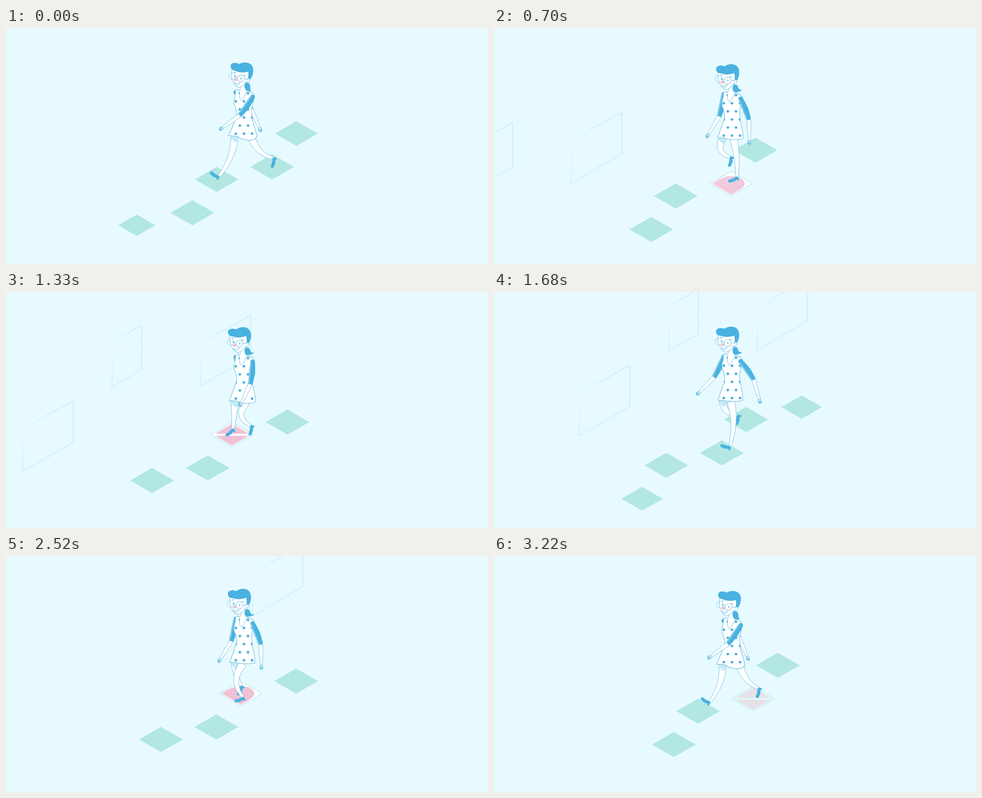
These frames come from a looping animation (1066 px wide and 525 px high, 3.29 s). An HTML page with a canvas:

```html
<!DOCTYPE html>
<html lang="en">
<head>
<meta charset="utf-8">
<title>Walking across tiles</title>
<style>
  html, body { margin: 0; width: 100%; height: 100%; overflow: hidden; background: #e7faff; }
  canvas { display: block; width: 100vw; height: 100vh; }
</style>
</head>
<body>
<canvas id="stage" width="1066" height="525"></canvas>
<script>
const ctx = document.getElementById('stage').getContext('2d');
const BG = '#e7faff', BLUE = '#49b2e0', LIGHT = '#8fd0ea', PALE = '#c5e9f5', LINE = '#74c0df',
      GREEN = '#b2e7e2', PINK = '#efc1d6', WALL = '#d1f1f5';

const TICK = 70, TICKS = 47, SPAN = 146, STEP = SPAN / 6, STRIDE = 48;
const skips = [10, 21, 28, 34];

const clamp = v => Math.max(0, Math.min(1, v));
const ramp = (v, from, length) => clamp((v - from) / length);
const smooth = t => t * t * (3 - 2 * t);
const easeOut = t => 1 - (1 - t) ** 2;
const mix = (a, b, t) => a + (b - a) * t;
const mixPoint = (a, b, t) => [mix(a[0], b[0], t), mix(a[1], b[1], t)];
const middle = (a, b) => mixPoint(a, b, .5);
const rad = deg => deg * Math.PI / 180;
const swing = (w, lead) => Math.cos(2 * Math.PI * (w + lead) / STRIDE);

// Eases between the turning points of one stride: [moment, value].
function sway(w, turns) {
  const i = turns.findLastIndex(([moment]) => moment <= w);
  const [t0, a] = turns.at(i), [t1, b] = turns[(i + 1) % turns.length];
  const wrap = t => (t + STRIDE) % STRIDE;
  return mix(a, b, (1 - Math.cos(Math.PI * wrap(w - t0) / wrap(t1 - t0))) / 2);
}

// Drawing helpers
function paint(path, fill, line, width = 1) {
  if (fill) { ctx.fillStyle = fill; ctx.fill(path); }
  if (line) { ctx.strokeStyle = line; ctx.lineWidth = width; ctx.stroke(path); }
}
const draw = (d, fill, line, width) => paint(new Path2D(d), fill, line, width);
function disc(x, y, r, fill, line) {
  const p = new Path2D();
  p.arc(x, y, r, 0, 7);
  paint(p, fill, line);
}
function stroke(a, b, color, width, cap = 'round') {
  ctx.lineCap = cap;
  ctx.lineWidth = width;
  ctx.strokeStyle = color;
  ctx.beginPath();
  ctx.moveTo(...a);
  ctx.lineTo(...b);
  ctx.stroke();
}

// Tapered tube that bends through a middle point.
function tube(a, k, b, w0, w1, w2) {
  const c = [0, 1].map(i => 2 * k[i] - (a[i] + b[i]) / 2);
  const left = [], right = [];
  for (let i = 0; i <= 16; i++) {
    const t = i / 16, p = mixPoint(mixPoint(a, c, t), mixPoint(c, b, t), t);
    const v = [0, 1].map(j => mix(c[j] - a[j], b[j] - c[j], t));
    const r = (t < .5 ? mix(w0, w1, t * 2) : mix(w1, w2, t * 2 - 1)) / 2 / (Math.hypot(...v) || 1);
    left.push([p[0] + v[1] * r, p[1] - v[0] * r]);
    right.unshift([p[0] - v[1] * r, p[1] + v[0] * r]);
  }
  return new Path2D('M' + left.concat(right).map(p => p.join(' ')).join('L') + 'Z');
}

// Walls
const noise = n => { const v = Math.sin(n * 91.7) * 4375.5; return v - Math.floor(v); };
function brush(a, b, from, to, seed) {
  const n = 22;
  for (let i = 0; i < n; i++) {
    const t = i / n, strength = mix(from, to, t);
    ctx.globalAlpha = clamp(strength * 1.3);
    stroke(mixPoint(a, b, t), mixPoint(a, b, t + 1 / n), WALL,
           (.8 + 2.2 * strength) * (.75 + .4 * noise(i + seed)), 'butt');
  }
  ctx.globalAlpha = 1;
}
function wall(x, y, w, h) {
  const tl = [x - w + 3, y + .54 * w], tr = [x, y], br = [x, y + h], bl = [x - w, y + h + .585 * w];
  brush(tl, tr, .35, 1, 1);
  brush(tr, br, .95, .85, 31);
  brush(br, bl, .75, .65, 67);
  brush(bl, tl, .8, 0, 93);
}
function walls(s) {
  const d = s - 58, x = 9.53 * d - .0022 * d * d, y = -.525 * x;
  wall(541.5 + x, 52 + y, 112, 92);
  wall(300 + x, 74 + y, 66, 99);
  wall(148.5 + x, 242.5 + y, 112, 92);
}

// Tiles
const motifs = [
  'M-22 -12.5L42.5 -.5L-.5 24.5Z',
  'M-42 0C-25 -11 -14 -17 2 -16.5C20 -16 30 -8 30 0C30 8 22 12 0 24.5Z',
  'M-37 -2L0 -24L37 -2ZM-37 2.5L0 24.5L37 2.5Z'
];
const diamond = (w, h) => `M${-w} 0L0 ${-h}L${w} 0L0 ${h}Z`;
function tiles(s) {
  for (let i = -6; i <= 6; i++) {
    const age = s + 4 - STEP * i, turn = (i + 8) % 6;
    if (age <= 0 || age > 107.5) continue;
    const size = easeOut(ramp(age, 0, 6.5)) - ramp(age, 100.5, 7) ** 2;
    const [x, y] = i % 2 ? [309.4, 470.4] : [274.8, 447.2];
    const lit = ramp(age, 55.5, 4.5) * (1 - ramp(age, turn === 1 ? 71.7 : 69, 7));
    ctx.save();
    ctx.translate(x + 3.627 * age, y - 2.096 * age);
    ctx.scale(size, size);
    draw(diamond(48.3, 27.9), lit < 1 ? GREEN : BG);
    if (lit > 0) {
      ctx.globalAlpha = lit;
      draw(diamond(48.5, 28), BG);
      draw(diamond(47.3, 27.2), '#fff', '#9fd9dc');
      draw(motifs[turn % 3], PINK);
    }
    ctx.restore();
  }
}

// Legs: u runs from landing (0) through lift-off (.5) to the next landing (1).
function leg(u, hip, land, lift, arc, shaded) {
  const away = u < .5 ? u * 2 : 2 - u * 2, rise = u < .5 ? 0 : Math.sin(2 * Math.PI * (u - .5));
  const ankle = mixPoint(land, lift, away).map((v, i) => v + arc[i] * rise);

  const bend = mix(-8, mix(-8, 18, clamp(u / .75)), 1 - smooth(ramp(u, .8, .17)));
  const span = [ankle[0] - hip[0], ankle[1] - hip[1]], reach = Math.hypot(...span);
  const mid = middle(hip, ankle);
  const knee = [mid[0] - span[1] / reach * bend, mid[1] + span[0] / reach * bend];

  const shape = tube(hip, knee, ankle, 17, 11, 5.5);
  paint(shape, '#fff', LINE);
  if (shaded) {
    ctx.save();
    ctx.clip(shape);
    const [x, y] = hip;
    draw(`M${x - 14} ${y - 6}H${x + 14}V${y + 3}L${x + 2} ${y + 15}L${x - 12} ${y + 2}Z`, PALE);
    ctx.restore();
  }

  const pitch = rad(-28 + 108 * easeOut(clamp(u * 2)) * (1 - smooth(ramp(u, .74, .18))));
  const dx = -Math.cos(pitch), dy = Math.sin(pitch);
  const from = (along, below) => [ankle[0] + dx * along + dy * below, ankle[1] + dy * along - dx * below];
  stroke(ankle, from(0, 5), BLUE, 4.5);
  paint(tube(ankle, from(9, 1.5), from(18, 0), 6, 7.5, 6.5), BLUE);
  disc(...from(18, 0), 3.2, BLUE);
}

// Arms: angles are measured from hanging straight down, forward is positive.
function arm(shoulder, angle) {
  const along = (p, deg, len) => [p[0] - Math.sin(rad(deg)) * len, p[1] + Math.cos(rad(deg)) * len];
  const elbow = along(shoulder, angle, 50), wrist = along(elbow, angle + 19, 47);
  paint(tube(elbow, middle(elbow, wrist), wrist, 9, 7.5, 4.5), '#fff', LINE);

  ctx.save();
  ctx.translate(...wrist);
  ctx.rotate(rad(angle + 19));
  draw('M-2.5 -1Q-5 4 -2 8Q1 10 3 6Q4 3 2.5 -1Z', PALE, LINE);
  draw('M-1 4L-1.5 8M1.5 4L1.5 7M-3 2L-4 5', null, BLUE, 1.4);
  ctx.restore();

  const [mx, my] = middle(shoulder, elbow);
  disc(...shoulder, 5, BLUE);
  paint(tube(shoulder, [mx + 1.5, my], elbow, 10, 13, 10), BLUE);
  const front = p => along(p, angle + 90, 3.8);
  ctx.setLineDash([2, .6]);
  stroke(front(shoulder), front(elbow), LIGHT, 3.4, 'butt');
  ctx.setLineDash([]);
}

function dress(drop) {
  const right = 549 + drop * .75, left = 496 - drop * .5;
  const shape = new Path2D(
    `M508 138Q511 137 516 137L533 139Q543 141 549 148Q548 162 544 174Q542 187 546 208` +
    `Q551 226 ${right} 240Q${right - 3} ${240 + drop * 1.1} 538 ${241 + drop}` +
    `Q522 ${241 + drop} 512 241Q503 239 ${left} 239.5Q503 216 510 196Q511 182 505 171Q502 162 507 150Z`);
  paint(shape, '#fff', LINE, 1.2);
  ctx.save();
  ctx.clip(shape);
  for (let row = 0; row < 6; row++)
    for (let x = row % 2 ? 508 : 499; x < 560; x += 18) disc(x + .2, 144.8 + row * 18, 2.9, BLUE);
  ctx.restore();
  draw('M518 126L516.5 137V152Q517 160 521 160Q526 156 533 139Q528 135 528 122Z', '#fff');
  draw('M519 131Q520 136 516.5 139V152Q517 160 521 160Q527 155 533 139Q528 136 528 127', null, LINE);
}

function head(lean) {
  const tx = 541 - lean * 1.3, ty = 141 + lean * 1.2;
  draw(`M530 121Q538 120 540 127Q540 133 ${tx} ${ty}Q534 142 529 135Q526 128 530 121Z`, BLUE);
  ctx.save();
  ctx.translate(521, 138);
  ctx.rotate(rad(lean));
  ctx.translate(-521, -138);
  draw('M500 92Q497 110 503 121Q509 132 515 132Q525 129 530 121L538 115V94Z', '#fff', LINE);
  draw('M497 87C495 76 508 75 516 80C523 75 541 74 546 87C549 97 545 108 540 114L535 113' +
       'Q537 105 536 97Q519 101 507 95Q498 93 497 87Z', BLUE);
  draw('M533 114Q538 110 540 115Q540 120 534 120', '#fff', LINE);
  draw('M504 115Q505 111 508 112Q511 109 512 114Q511 119 507 118Q504 118 504 115Z', PINK);
  disc(500.5, 106.5, 7.6, null, '#92cfe7');
  disc(519.5, 112, 7.8, '#fff', LINE);
  draw('M508 109Q510 108 512 110M527 112L536 115', null, LINE);
  draw('M505 98L509 98.5M525 104L529 106', null, BLUE, 1.2);
  draw('M506 105.5V108.5M520 110.5V113.5', null, BLUE, 1.8);
  draw('M504 121Q511 124 518 121Q516 127 511 127Q507 127 504 121Z', '#fff', LINE, .8);
  draw('M506 124Q511 125 516 124', null, '#a5d8ec', .8);
  ctx.restore();
}

function walker(w) {
  const bob = sway(w, [[3, -.3], [8, 3], [17, -3], [36, 6]]);
  const lean = sway(w, [[1, 0], [11, -6.8], [39, -6]]);
  const beat = w / STRIDE;
  ctx.lineCap = ctx.lineJoin = 'round';
  arm([508, 143 + bob], -8 - 35 * swing(w, .5));
  leg(beat, [506, 240 + bob], [470, 331], [546, 270], [0, 0], true);
  leg((beat + .5) % 1, [533 + 11 * swing(w, 3), 243 + bob], [515, 350], [592, 290], [-18, -17], false);
  ctx.save();
  ctx.translate(0, bob);
  dress(4.5 + 4 * swing(w, 2));
  head(lean);
  ctx.restore();
  arm([545.5, 153 + bob], 36 * swing(w, .5) - 1);
}

function frame(now) {
  const tick = Math.floor(now / TICK) % TICKS;
  const s = tick * 3 + skips.filter(n => n <= tick).length;
  ctx.fillStyle = BG;
  ctx.fillRect(0, 0, 1066, 525);
  walls(s);
  tiles(s);
  walker(s % STRIDE);
  requestAnimationFrame(frame);
}
requestAnimationFrame(frame);
</script>
</body>
</html>
```
